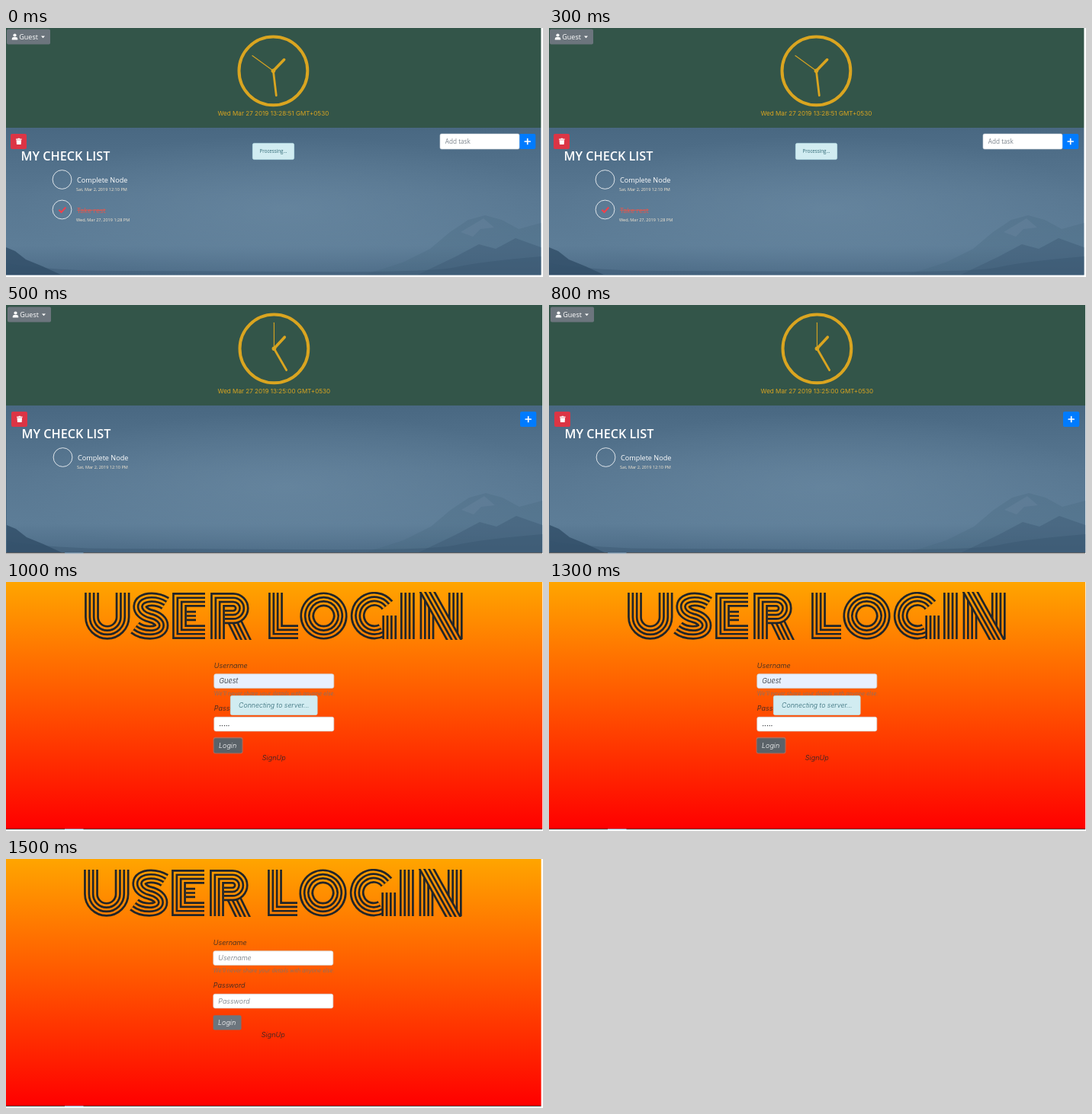
These frames come from a looping animation (704x327 px, 2 s). An HTML page:

```html
<!DOCTYPE html>
<html lang="en">
<head>
<meta charset="utf-8">
<title>Check list</title>
<style>
  html, body { margin: 0; width: 100%; height: 100%; overflow: hidden; background: #fff; }
  svg { display: block; width: 704px; height: 327px; }
  text { font-family: "Open Sans", "Noto Sans", sans-serif; white-space: pre; }
  .wide { font-family: Inter, sans-serif; }
  .login text { font-family: Inter, sans-serif; font-style: italic; font-weight: 300; }
</style>
</head>
<body>
<svg id="stage" viewBox="0 0 704 327" xmlns="http://www.w3.org/2000/svg"></svg>
<script>
const STEP = 500;
const GOLD = '#daa520', INK = '#212529', GREY = '#6c757d';

const rect = (x, y, w, h, fill, extra = '') =>
  `<rect x="${x}" y="${y}" width="${w}" height="${h}" fill="${fill}" ${extra}/>`;
const path = (d, fill, extra = '') => `<path d="${d}" fill="${fill}" ${extra}/>`;
const text = (x, y, size, fill, str, extra = '') =>
  `<text x="${x}" y="${y}" font-size="${size}" fill="${fill}" ${extra}>${str}</text>`;
const shift = (x, y, body) => `<g transform="translate(${x} ${y})">${body}</g>`;

// Four parallel lines per letter stroke, made of nested strokes in a mask.
const LETTERS = [
  'M111.5 14V46A20.3 20.3 0 0 0 152.1 46V14',
  'M208 28Q200 22.9 190 22.9C170 22.9 170 40 188 44.5C208 49 208 66.3 188 66.3Q176 66.3 168 60',
  'M260 23.4H226.5V65.6H260',
  'M294 42L313 81',
  'M276.5 75V23.4H297A11.2 11.2 0 0 1 297 45.8H286',
  'M352.5 14V65.6H382',
  'M415.5 22.8a21.7 21.7 0 1 1 -.01 0Z',
  'M499 30.5A21.8 21.8 0 1 0 492 63.5',
  'M501.7 75V44',
  'M525.4 14V75',
  'M551 14V75', 'M588.3 14V75',
  'M549 8.6L590 82.4'
];
const BANDS = [[18.8, '#fff'], [13.4, '#000'], [8, '#fff'], [2.6, '#000']];

const titleMask = LETTERS.map(d =>
  BANDS.map(([w, c]) => path(d, 'none', `stroke="${c}" stroke-width="${w}"`)).join('')
).join('') + path('M236 39.2h12M236 44.5h12M236 49.8h12', 'none', 'stroke="#fff" stroke-width="2.7"');

const defs = `<defs>
  <linearGradient id="sky" x2="0" y2="1">
    <stop offset="0" stop-color="#496882"/><stop offset=".45" stop-color="#587791"/>
    <stop offset=".8" stop-color="#5d7d97"/><stop offset="1" stop-color="#4d6c87"/>
  </linearGradient>
  <radialGradient id="glow" cx=".52" cy=".55" r=".5">
    <stop offset="0" stop-color="#6c8ba4" stop-opacity=".6"/>
    <stop offset="1" stop-color="#6c8ba4" stop-opacity="0"/>
  </radialGradient>
  <linearGradient id="fire" x2="0" y2="1">
    <stop offset="0" stop-color="#ffa500"/><stop offset="1" stop-color="#f00"/>
  </linearGradient>
  <mask id="lines" maskUnits="userSpaceOnUse" x="90" y="13.4" width="520" height="62.4">${titleMask}</mask>
</defs>`;

function hand(deg, len, w) {
  return `<path d="M0 0V${-len}" transform="rotate(${deg})" stroke="${GOLD}" stroke-width="${w}" stroke-linecap="round"/>`;
}

function clock(h, m, s) {
  return shift(350.4, 56.3,
    `<circle r="44.9" fill="none" stroke="${GOLD}" stroke-width="4"/>` +
    hand((h % 12 + m / 60) * 30, 20.5, 3.6) +
    hand((m + s / 60) * 6, 32.5, 2.8) +
    hand(s * 6, 34, 1.1) +
    `<circle r="2.8" fill="${GOLD}"/>`);
}

function landscape(w) {
  return rect(0, 131, w, 193.5, 'url(#sky)') + rect(0, 131, w, 193.5, 'url(#glow)') +
    path(`M470 324L520 308L556 290L582 268L606 252L628 246L650 252L672 264L${w} 256V324Z`, '#48677f', 'opacity=".3"') +
    path(`M540 324L590 300L620 284L642 290L668 276L${w} 288V324Z`, '#3c5a74', 'opacity=".45"') +
    path('M596 268L626 250L640 262L622 264L612 274Z', '#7c98ae', 'opacity=".2"') +
    path('M0 288L12 293L26 304L48 313L72 324H0Z', '#2c4861', 'opacity=".7"') +
    path(`M0 309Q60 319 150 319T400 320T590 314T${w} 300V324.5H0Z`, '#34526b', 'opacity=".35"');
}

function task(y, name, date, done) {
  return `<circle cx="73.5" cy="${y}" r="12.4" fill="none" stroke="#fff" stroke-width=".8"/>` +
    (done ? path(`M69.3 ${y + .3}l3.2 3.2l5.8 -6.6`, 'none', 'stroke="#f0404c" stroke-width="2.2"') : '') +
    text(93, y + 4, 9.1, done ? '#e0584f' : '#fff', name, done ? 'text-decoration="line-through"' : '') +
    text(92, y + 15.3, 5.55, '#f5e8d2', date);
}

function listPage(w, time, extra) {
  const [h, m, s] = time.split(':').map(Number);
  return rect(-1, -1, w + 1, 132, '#335549') + landscape(w) +
    rect(-1, 131, 1, 193.5, '#496882') +
    rect(1, 1.5, 57, 20, GREY, 'rx="2"') +
    '<circle cx="11.5" cy="9.5" r="2.1" fill="#fff"/>' +
    path('M7.8 15.5V14.2Q7.8 12 10 12H13Q15.2 12 15.2 14.2V15.5Z', '#fff') +
    text(17.3, 14.8, 9, '#fff', 'Guest') +
    path('M46 10.6h5l-2.5 2.7Z', '#fff') +
    clock(h, m, s) +
    text(350.4, 114.8, 8.1, GOLD, `Wed Mar 27 2019 ${time} GMT+0530`, 'class="wide" text-anchor="middle"') +
    rect(6, 139, 21, 20, '#dc3545', 'rx="2"') +
    path('M13 145.6h2.2l.6 -.8h2l.6 .8h2.2v1.1h-7.6ZM13.5 147.3h6.6l-.5 5.8h-5.6Z', '#fff') +
    text(19.6, 173.6, 16.2, '#fff', 'MY CHECK LIST', 'font-weight="600"') +
    task(199, 'Complete Node', 'Sat, Mar 2, 2019 12:10 PM', false) +
    rect(673, 139, 21.3, 20, '#007bff', 'rx="2"') +
    path('M680.2 149h7M683.7 145.5v7', 'none', 'stroke="#fff" stroke-width="1.7" stroke-linecap="round"') +
    extra;
}

function alertBox(x, y, w, h, size, str) {
  return rect(x + .4, y + .4, w - .8, h - .8, '#d1ecf1', 'rx="2" stroke="#bee5eb" stroke-width=".8"') +
    text(x + w / 2, y + h / 2 + size * .36, size, '#2f6874', str, 'text-anchor="middle"');
}

const busy = task(238.5, 'Take rest', 'Wed, Mar 27, 2019 1:28 PM', true) +
  alertBox(323, 151, 55, 22, 6.2, 'Processing...') +
  rect(569, 139, 104, 20, '#fff', 'rx="2" stroke="#ced4da" stroke-width=".6"') +
  text(575.8, 152.4, 8.2, '#7d858d', 'Add task');

function field(y, fill, color, value, size = 9) {
  return rect(271.8, y + .3, 157, 18.6, fill, 'rx="2.3" stroke="#ced4da" stroke-width=".7"') +
    text(278.3, y + 12.6, size, color, value);
}

function loginPage(dx, w, sent) {
  const form = rect(90, 13, 520, 63, INK, 'mask="url(#lines)"') +
    text(271.8, 112.6, 9.1, INK, 'Username') +
    (sent ? field(120.5, '#e8f0fe', INK, 'Guest', 9.2) : field(120.5, '#fff', GREY, 'Username')) +
    text(271.8, 149.4, 7.2, GREY, "We'll never share your details with anyone else.") +
    text(271.8, 169.4, 9.1, INK, 'Password') +
    (sent ? field(177, '#fff', INK, '•••••', 5) : field(177, '#fff', GREY, 'Password')) +
    (sent ? rect(270.6, 203.8, 39, 21.8, '#828a91', 'rx="3" opacity=".6"') : '') +
    rect(271.6, 205.2, 36.9, 19.2, sent ? '#5a6268' : GREY, 'rx="2"') +
    text(278, 218, 9, '#fff', 'Login') +
    text(334.8, 233.8, 9.1, INK, 'SignUp') +
    (sent ? alertBox(293, 149, 114.5, 26, 8.8, 'Connecting to server...') : '');
  return `<g class="login">${rect(0, 0, w, 324, 'url(#fire)')}${shift(dx, 0, form)}</g>` +
    taskbar(324, 1, w);
}

function taskbar(y, h, w) {
  return rect(0, y, w, h, '#4a4340') + rect(77, y, 24.5, h, '#86aac6');
}

const scenes = [
  listPage(701.4, '13:28:51', busy),
  shift(1, 1, listPage(702.2, '13:25:00', '')) + taskbar(325.3, 1, 703.2),
  loginPage(1, 703.2, true),
  loginPage(0, 701.6, false)
];

const stage = document.getElementById('stage');
stage.innerHTML = defs + scenes.map(s => `<g class="scene">${s}</g>`).join('');
const groups = [...stage.querySelectorAll('.scene')];

function show(ms) {
  const now = Math.floor(ms / STEP) % groups.length;
  groups.forEach((g, i) => g.style.display = i === now ? '' : 'none');
}

const start = performance.now();
function tick() {
  show(performance.now() - start);
  requestAnimationFrame(tick);
}
tick();
</script>
</body>
</html>
```
